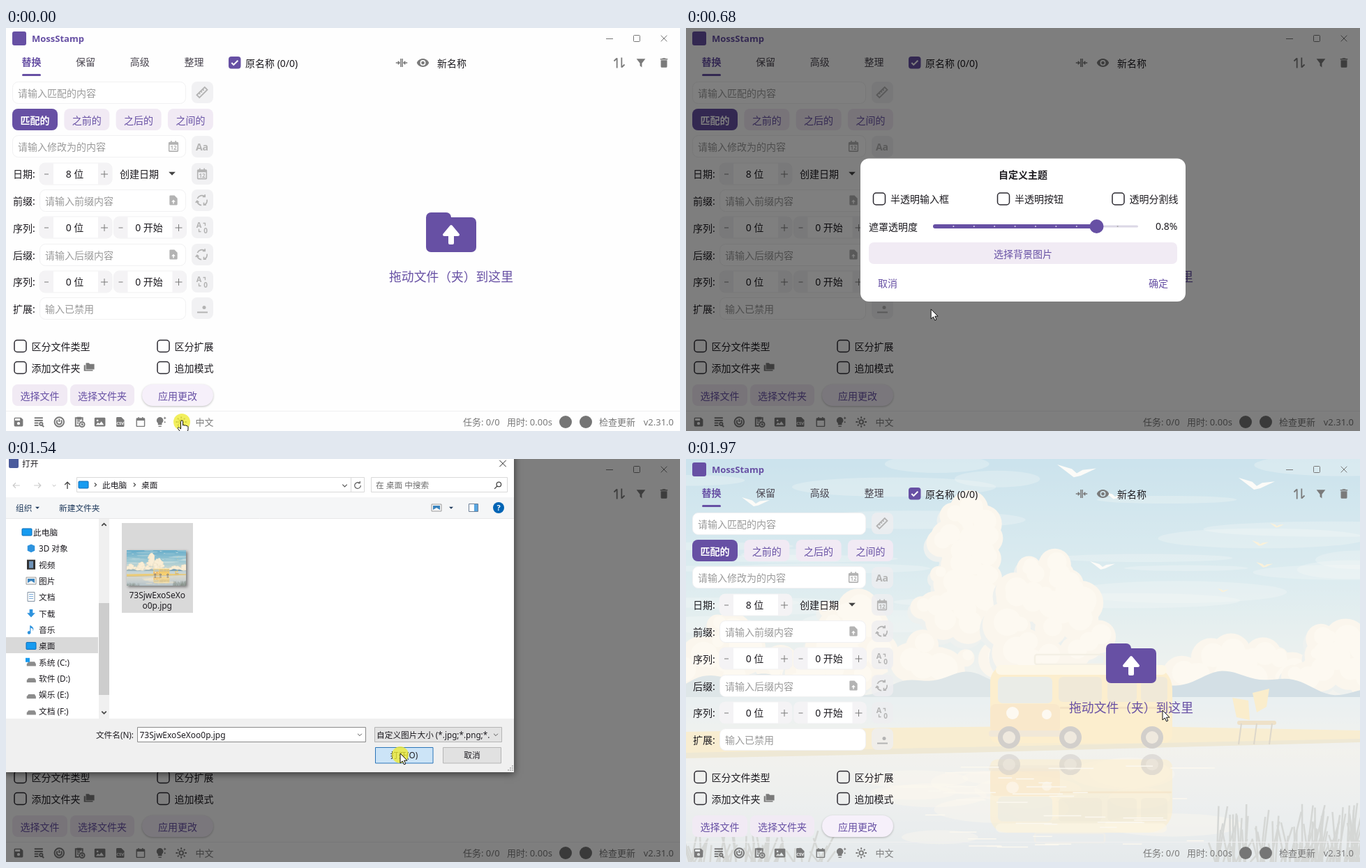
Write an HTML page with a canvas that moves like this. It is 966 by 579 pixels and loops after 2.42 s.

```html
<!DOCTYPE html>
<html lang="zh">
<head>
<meta charset="utf-8">
<style>
html, body { margin: 0; width: 100%; height: 100%; overflow: hidden; background: #fefefe; }
canvas { display: block; }
</style>
</head>
<body>
<canvas id="stage" width="966" height="579"></canvas>
<script>
const W = 966, H = 579, LOOP = 2420;
const STEPS = [0, 470, 540, 610, 680, 750, 820, 890, 960, 1020, 1080, 1150, 1210, 1280,
  1340, 1410, 1470, 1540, 1610, 1680, 1750, 1820, 1900, 1970];
const FONT = '"Noto Sans", "Noto Sans CJK SC", "Noto Sans CJK", sans-serif';
const PURPLE = '#6750a4', PILL = '#f1eaf4', INK = '#1d1b20', GREY = '#7a7a7a', HINT = '#9a9a9a', FAINT = '#b3b3b3';
let g = document.getElementById('stage').getContext('2d');

const ICON = {
  trash: 'M6 19a2 2 0 0 0 2 2h8a2 2 0 0 0 2-2V7H6zM19 4h-3.5l-1-1h-5l-1 1H5v2h14z',
  filter: 'M3 4h18l-7 9v8l-4-3v-5z',
  sort: 'M8 21V4M3 9L8 4M16 3v17M21 15L16 20',
  eye: 'M12 4.5C7 4.5 2.7 7.6 1 12c1.7 4.4 6 7.5 11 7.5s9.3-3.1 11-7.5c-1.7-4.4-6-7.5-11-7.5zM12 7a5 5 0 1 1 0 10a5 5 0 1 1 0-10zM12 9a3 3 0 1 0 0 6a3 3 0 1 0 0-6z',
  split: 'M1 12h7M5 9l3 3-3 3M23 12h-7M19 9l-3 3 3 3M10.5 4v16M13.5 4v16',
  calendar: 'M5 4h2V2h2v2h6V2h2v2h2a2 2 0 0 1 2 2v14a2 2 0 0 1-2 2H5a2 2 0 0 1-2-2V6a2 2 0 0 1 2-2zM5 9v11h14V9z',
  ruler: 'M2 17L17 2l5 5L7 22zM6 13l2.5 2.5M9.5 9.5l2.5 2.5M13 6l2.5 2.5',
  fileUp: 'M6 2h8l6 6v12a2 2 0 0 1-2 2H6a2 2 0 0 1-2-2V4a2 2 0 0 1 2-2zM11 19h2v-4h3l-4-4-4 4h3z',
  cycle: 'M4 9a8.5 8.5 0 0 1 13-3.5M17 2v4h-4M20.5 11a8.5 8.5 0 0 1-5 9M19 20h-4v-4M11 20.5a8.5 8.5 0 0 1-7.5-7M1 16l2.5-3 3 2.5',
  swap: 'M14 4h4v5M10 20H6v-5',
  save: 'M5 3h12l4 4v12a2 2 0 0 1-2 2H5a2 2 0 0 1-2-2V5a2 2 0 0 1 2-2zM5 5v4h10V5zM12 12a3 3 0 1 0 0 6a3 3 0 1 0 0-6z',
  list: 'M3 4h17M3 9h17M3 14h8M3 19h8M16.5 13a3 3 0 1 0 0 6a3 3 0 1 0 0-6M19 19l3 3',
  power: 'M12 2.5a9.5 9.5 0 1 0 0 19a9.5 9.5 0 1 0 0-19M12 6v6M8.5 8.5a5 5 0 1 0 7 0',
  clip: 'M11 20H4V4h14v6M8 3h6v3H8zM7 10h6M7 14h3M17 12a5 5 0 1 0 0 10a5 5 0 1 0 0-10M17 14.5v3h2',
  image: 'M3 3h18a2 2 0 0 1 2 2v14a2 2 0 0 1-2 2H3a2 2 0 0 1-2-2V5a2 2 0 0 1 2-2zM4 18h16l-5-7-4 5-3-3zM7 7a2 2 0 1 0 .1 0z',
  doc: 'M6 2h8l6 6v12a2 2 0 0 1-2 2H6a2 2 0 0 1-2-2V4a2 2 0 0 1 2-2z',
  bulb: 'M10 2a7 7 0 0 0-4 12.5V18h8v-3.5A7 7 0 0 0 10 2zM7 20h6v2H7zM20 1l1 2 2 1-2 1-1 2-1-2-2-1 2-1zM20 10l.7 1.5 1.5.7-1.5.7-.7 1.5-.7-1.5-1.5-.7 1.5-.7z',
  sun: 'M12 8a4 4 0 1 0 0 8a4 4 0 1 0 0-8M12 1v4M12 19v4M1 12h4M19 12h4M4.5 4.5l2.5 2.5M17 17l2.5 2.5M4.5 19.5L7 17M17 7l2.5-2.5',
  folders: 'M5 4h6l2 2h9v11H5zM1 8h3v10h15v2H1z',
  cross: 'M4 4L20 20M20 4L4 20',
  tick: 'M4.5 12.5l5 5L20 7',
  down: 'M5 9l7 7 7-7',
  up: 'M5 16l7-7 7 7',
  right: 'M9 5l7 7-7 7',
  left: 'M21 12H3M10 5l-7 7 7 7',
  ahead: 'M3 12h18M14 5l7 7-7 7',
  rise: 'M12 21V3M5 10l7-7 7 7',
  refresh: 'M20 12a8 8 0 1 1-3-6.2M18 1v5h-5',
  lens: 'M14.5 3a6 6 0 1 0 0 12a6 6 0 1 0 0-12M10 14l-7 7',
  caret: 'M3 8h18l-9 9z',
  note: 'M9 2v14a4 4 0 1 0 2 3V8c6 1 6 4 5 8 4-6 1-10-5-14z',
  arrow: 'M8 2h8v9h6L12 22 2 11h6z',
  cube: 'M12 2l9 4v12l-9 4-9-4V6z',
  drive: 'M2 13l4-5h14l3 5v5H2z'
};

function box(x, y, w, h, r, fill, stroke, lw = 1) {
  g.beginPath();
  g.roundRect(x, y, w, h, r);
  if (fill) { g.fillStyle = fill; g.fill(); }
  if (stroke) { g.strokeStyle = stroke; g.lineWidth = lw; g.stroke(); }
}
function oval(x, y, rx, ry, fill) {
  g.beginPath();
  g.ellipse(x, y, rx, ry, 0, 0, 7);
  g.fillStyle = fill;
  g.fill();
}
const disc = (x, y, r, fill) => oval(x, y, r, r, fill);
function line(x1, y1, x2, y2, col, lw = 1) {
  g.beginPath();
  g.moveTo(x1, y1);
  g.lineTo(x2, y2);
  g.strokeStyle = col;
  g.lineWidth = lw;
  g.stroke();
}
function text(s, x, y, size = 14, col = INK, align = 'left', weight = 400) {
  g.font = `${weight} ${size}px ${FONT}`;
  g.textAlign = align;
  g.fillStyle = col;
  g.fillText(s, x, y + size * 0.37);
}
function icon(name, x, y, size, col, lw) {
  const p = new Path2D(ICON[name]);
  g.save();
  g.translate(x - size / 2, y - size / 2);
  g.scale(size / 24, size / 24);
  if (lw) {
    g.strokeStyle = col;
    g.lineWidth = lw * 24 / size;
    g.stroke(p);
  } else {
    g.fillStyle = col;
    g.fill(p, 'evenodd');
  }
  g.restore();
}
function poly(col, ...pts) {
  g.beginPath();
  for (let i = 0; i < pts.length; i += 2) g.lineTo(pts[i], pts[i + 1]);
  g.closePath();
  g.fillStyle = col;
  g.fill();
}
// Paints a group as one sheet with a common opacity.
function layer(alpha, draw) {
  const outer = g, sheet = document.createElement('canvas');
  sheet.width = W;
  sheet.height = H;
  g = sheet.getContext('2d');
  draw();
  g = outer;
  g.save();
  g.globalAlpha = alpha;
  g.drawImage(sheet, 0, 0);
  g.restore();
}
function fade(y0, y1, ...cols) {
  const f = g.createLinearGradient(0, y0, 0, y1);
  cols.forEach((c, i) => f.addColorStop(i / (cols.length - 1), c));
  return f;
}

// --- wallpaper ---
let seed = 1;
const rnd = () => (seed = seed * 16807 % 2147483647) / 2147483647;

function cloud(cx, top, wide, n, lean = 0) {
  const puffs = Array.from({ length: n }, () => {
    const u = rnd();
    return [cx + lean * u + (rnd() * 2 - 1) * wide * (0.25 + 0.75 * u), top + 20 + u * (300 - top), 12 + rnd() * 22];
  });
  for (const [x, y, r] of puffs) disc(x - 4, y + 7, r, '#cfd6d0');
  for (const [x, y, r] of puffs) disc(x, y, r, '#f3e6cb');
  for (const [x, y, r] of puffs) disc(x + 3, y - 4, r * 0.6, '#faeed6');
}
function ridge(col, base, amp, x0, x1, k) {
  g.beginPath();
  g.moveTo(x0, 348);
  for (let x = x0; x <= x1; x += 6)
    g.lineTo(x, base - amp * (0.6 + 0.4 * Math.sin(x * k) + 0.15 * Math.sin(x * k * 3.3)));
  g.lineTo(x1, 348);
  g.fillStyle = col;
  g.fill();
}
function van() {
  box(500, 281, 100, 14, 3, null, '#e0d3b4', 2.5);
  box(436, 296, 261, 112, [24, 34, 12, 10], '#f6cf70');
  box(444, 296, 245, 14, 10, '#fbe8b8');
  box(436, 352, 100, 42, 8, '#efbb66');
  box(447, 313, 78, 38, 7, '#c3c7b8');
  for (const [x, w] of [[534, 62], [604, 42], [652, 38]]) box(x, 313, w, 36, 6, '#d3c08e');
  box(536, 356, 160, 3, 1, '#e0aa55');
  disc(468, 365, 9, '#faefd6');
  disc(517, 367, 7, '#faefd6');
  box(434, 390, 110, 9, 4, '#d6bc8c');
  for (const x of [463, 551, 668]) {
    disc(x, 400, 16, '#7d7268');
    disc(x, 400, 9, '#d0c0a0');
  }
}
function bird(x, y, s, col) {
  poly(col, x - 2 * s, y - s, x - s * 0.5, y - s * 0.55, x, y - s * 0.1, x + s * 0.6, y - s * 0.45,
    x + 2 * s, y - s * 0.6, x + s * 0.4, y + s * 0.15, x - s * 0.3, y + s * 0.3);
}
function scene() {
  seed = 77;
  g.save();
  g.beginPath();
  g.rect(0, 0, W, H);
  g.clip();
  box(0, 0, W, 350, 0, fade(0, 345, '#68adca', '#9ac7d3', '#e0dfd0'));
  for (let i = 0; i < 26; i++) oval(rnd() * W, rnd() * 240, 60 + rnd() * 130, 4 + rnd() * 12, 'rgba(238,240,232,.28)');
  cloud(70, 215, 90, 24);
  cloud(225, 190, 90, 26);
  cloud(400, 50, 95, 60);
  cloud(500, 125, 110, 50, 50);
  cloud(800, 255, 120, 26);
  cloud(930, 235, 70, 20);
  ridge('#9fb6bb', 342, 32, 0, 450, 0.02);
  ridge('#7ea3b4', 343, 34, 690, W, 0.018);
  box(0, 342, W, H - 342, 0, fade(342, H, '#c0d3d8', '#dad9cc', '#c9d0d0', '#b4c2c8'));
  for (let i = 0; i < 14; i++) oval(300 + rnd() * 400, 450 + rnd() * 110, 40 + rnd() * 60, 8 + rnd() * 16, 'rgba(250,236,205,.4)');
  poly('#ebcc78', 0, 392, 300, 386, 600, 383, W, 390, W, 405, 700, 412, 400, 418, 0, 424);
  poly('#cdbb85', 0, 422, 400, 414, W, 402, W, 407, 400, 422, 0, 430);
  van();
  g.save();
  g.globalAlpha = 0.6;
  g.translate(0, 815);
  g.scale(1, -0.94);
  van();
  g.restore();
  poly('#f0cb6a', 783, 343, 806, 347, 808, 375, 789, 371);
  poly('#f0cb6a', 812, 336, 836, 330, 832, 356, 818, 364);
  box(790, 376, 56, 6, 3, '#cfa75e');
  for (const x of [796, 818, 840]) line(x, 380, x - 4, 410, '#9c8b68', 2);
  for (let i = 0; i < 40; i++) {
    const x = 330 + rnd() * 400, y = 440 + rnd() * 120;
    line(x, y, x + 15 + rnd() * 60, y, '#f3ead2', 1.5);
  }
  for (let i = 0; i < 150; i++) {
    const right = i % 3 > 0, x = right ? W - 210 * rnd() ** 1.4 : 210 * rnd();
    const tall = (right ? 70 : 35) * rnd() + 15;
    line(x, H, x + rnd() * 34 - 14, H - tall, '#848b84', 2.5);
  }
  for (const [x, y, s] of [[100, 65, 10], [560, 22, 14], [615, 55, 8], [597, 156, 9], [818, 40, 13]]) bird(x, y, s, '#f8f5ea');
  for (const [x, y, s] of [[847, 97, 5], [823, 123, 6], [829, 154, 6], [770, 190, 4]]) bird(x, y, s, '#f2d894');
  g.restore();
}

// --- main window ---
const check = (x, y) => box(x, y - 8.5, 17, 17, 4, null, '#2b2930', 1.5);
const input = (x, y, w, hint) => {
  box(x + 0.5, y + 0.5, w - 1, 31, 8, '#fff', '#f1f1f2');
  text(hint, x + 8, y + 16.5, 14, HINT);
};
function stepper(x, y, label) {
  box(x, y, 104, 31, 8, '#fff', '#f1f1f2');
  box(x, y, 20, 31, [8, 0, 0, 8], '#f4f3f5');
  box(x + 84, y, 20, 31, [0, 8, 8, 0], '#f4f3f5');
  line(x + 7, y + 16, x + 13, y + 16, GREY);
  line(x + 88, y + 16, x + 98, y + 16, GREY);
  line(x + 93, y + 11, x + 93, y + 21, GREY);
  text(label, x + 50.5, y + 16, 14, INK, 'center');
}
function calendar(x, y, col) {
  icon('calendar', x, y, 19, col);
  text('12', x, y + 2.5, 8, col, 'center', 700);
}
function square(y, draw) {
  box(266, y, 31, 31, 8, 'rgba(238,237,240,.8)');
  draw(281, y + 15.5);
}
const cycle = (x, y) => icon('cycle', x, y, 20, FAINT, 1.7);
function letters(x, y) {
  text('A', x - 4.5, y - 3.5, 11, FAINT, 'center', 600);
  text('0', x + 5, y + 5, 10, FAINT, 'center', 600);
  icon('swap', x, y, 18, FAINT, 1.3);
}
function pill(x, y, w, label, on) {
  box(x, y, w, 31, 8, on ? PURPLE : PILL);
  text(label, x + w / 2, y + 16.5, 14, on ? '#fff' : PURPLE, 'center', on ? 600 : 400);
}
function folder() {
  box(602, 265, 36, 30, 7, PURPLE);
  poly(PURPLE, 630, 265, 638, 272, 638, 280, 625, 280);
  box(602, 272, 72, 50, 7, PURPLE);
  poly('#fff', 638, 285, 648, 297, 640, 297, 640, 309, 636, 309, 636, 297, 628, 297);
  g.strokeStyle = '#fff';
  g.lineWidth = 4;
  g.lineJoin = 'round';
  g.stroke();
  g.lineJoin = 'miter';
}
function windowUi() {
  box(9, 5, 20, 20, 3, PURPLE);
  text('MossStamp', 37, 15, 13, PURPLE, 'left', 600);
  line(860, 15.5, 870, 15.5, '#777');
  box(899.5, 10.5, 9, 9, 1, null, '#777');
  icon('cross', 943, 15, 13, '#777', 1);

  text('替换', 36.5, 49, 14, PURPLE, 'center', 700);
  box(23, 66, 27, 3, 1.5, PURPLE);
  ['保留', '高级', '整理'].forEach((s, i) => text(s, 114 + i * 77.7, 49, 14, '#49454f', 'center'));
  box(319, 41, 17.5, 17.5, 4, PURPLE);
  icon('tick', 327.7, 49.7, 14, '#fff', 2);
  text('原名称 (0/0)', 343, 50.5);
  icon('split', 567, 50, 18, GREY, 1.5);
  icon('eye', 597.5, 50, 19, GREY);
  text('新名称', 618, 50.5);
  icon('sort', 879, 50, 20, GREY, 1.8);
  icon('filter', 910, 50, 17, GREY);
  icon('trash', 943, 50, 18, GREY);

  input(9, 77, 249, '请输入匹配的内容');
  square(77, (x, y) => icon('ruler', x, y, 18, FAINT, 1.8));
  ['匹配的', '之前的', '之后的', '之间的'].forEach((s, i) => pill(9 + i * 74.3, 116, 65, s, !i));
  input(9, 154, 249, '请输入修改为的内容');
  calendar(240, 170, FAINT);
  square(155, (x, y) => text('Aa', x, y, 14, FAINT, 'center', 600));

  ['日期:', '前缀:', '序列:', '后缀:', '序列:', '扩展:'].forEach((s, i) => text(s, 10, 210 + i * 38.8));
  stepper(48, 194, '8 位');
  text('创建日期', 163, 209.5);
  icon('caret', 238, 209, 13, '#444');
  square(194, (x, y) => calendar(x, y, FAINT));
  [['前缀', 232], ['后缀', 310]].forEach(([s, y]) => {
    input(48, y, 210, `请输入${s}内容`);
    icon('fileUp', 240, y + 15.5, 17, FAINT);
    square(y, cycle);
    stepper(48, y + 39, '0 位');
    stepper(154.5, y + 39, '0 开始');
    square(y + 39, letters);
  });
  input(48, 387, 210, '输入已禁用');
  square(387, (x, y) => {
    line(x - 7, y + 6, x + 8, y + 6, FAINT, 2);
    disc(x + 3, y - 1, 2.5, FAINT);
  });

  [[12, 457, '区分文件类型'], [217, 457, '区分扩展'], [12, 488, '添加文件夹'], [217, 488, '追加模式']].forEach(([x, y, s]) => {
    check(x, y);
    text(s, x + 24.5, y + 0.5);
  });
  icon('folders', 119.5, 487, 17, GREY);
  pill(9, 512, 79, '选择文件');
  pill(92, 512, 92, '选择文件夹');
  g.save();
  g.shadowColor = 'rgba(0,0,0,.25)';
  g.shadowBlur = 3;
  g.shadowOffsetY = 1;
  box(195, 512, 102, 31, 15.5, '#f6f0fa');
  g.restore();
  text('应用更改', 246, 528.5, 14, PURPLE, 'center');

  line(0, 550.5, W, 550.5, '#f0eff1');
  [['save'], ['list', 2], ['power', 2], ['clip', 2], ['image'], ['doc'], ['calendar'], ['bulb'], ['sun', 1.8]]
    .forEach(([n, lw], i) => icon(n, 18 + i * 29.15, 566, 17, GREY, lw));
  text('CSV', 163.7, 568, 6, '#fff', 'center', 700);
  text('中文', 271.5, 566.5, 13, GREY);
  text('任务: 0/0', 655, 566, 13, GREY);
  text('用时: 0.00s', 718, 566, 13, GREY);
  disc(802, 566, 9, '#757575');
  disc(831, 566, 9, '#757575');
  text('检查更新', 850, 566.5, 13, GREY);
  text('v2.31.0', 957, 566, 13, GREY, 'right');

  folder();
  text('拖动文件（夹）到这里', 638, 357, 17.8, PURPLE, 'center');
}

// --- theme panel ---
const panelShape = () => box(250, 187.5, 466, 205.5, 12, '#fff');
function panel(hover) {
  text('自定义主题', 483, 210.5, 14, INK, 'center', 700);
  [[268.5, '半透明输入框'], [446.5, '半透明按钮'], [611, '透明分割线']].forEach(([x, s]) => {
    check(x, 245.5);
    text(s, x + 24.5, 246);
  });
  text('遮罩透明度', 262, 285.5);
  box(354, 283.5, 294, 3, 1.5, '#dcd8e6');
  box(354, 282, 234, 6, 3, PURPLE);
  for (let i = 1; i < 10; i++) disc(354 + i * 29.4, 285, 1, i < 8 ? '#d9d0ee' : '#aaa');
  disc(588.5, 285, 10, PURPLE);
  text('0.8%', 704.5, 285, 14, INK, 'right');
  box(262, 308, 442, 31, 7, hover ? '#e4dde9' : '#f1ebf4');
  text('选择背景图片', 483, 324.5, 14, PURPLE, 'center');
  text('取消', 275, 367, 14, PURPLE);
  text('确定', 691, 367, 14, PURPLE, 'right');
}

// --- file chooser ---
const BLUE = '#0078d7', SKY = '#179bf0', FRAME = [-3.5, -8, 731.5, 458];
function sideItem(kind, x, y) {
  if (kind === 'screen') box(x - 7, y - 5, 14, 10, 1, SKY, '#0b6cb8');
  else if (kind === 'film') {
    box(x - 6, y - 7, 12, 14, 0, '#333');
    box(x - 3, y - 5, 6, 10, 0, '#6f93b8');
  } else if (kind === 'photo') {
    box(x - 7, y - 5, 14, 10, 0, '#f7f7f7', '#9a9a9a');
    poly('#3b84bd', x - 5, y - 3, x + 5, y - 3, x + 5, y + 3, x, y, x - 5, y + 3);
  } else if (kind === 'page') {
    box(x - 5, y - 7, 10, 13, 0, '#fff', '#7f8fa0');
    for (let i = -4; i < 5; i += 3) line(x - 3, y + i, x + 3, y + i, '#6fa5d8');
  } else if (kind === 'drive') icon('drive', x, y + 2, 15, '#8c8c8c');
  else icon(kind, x, y, 14, '#2e93de');
}
function combo(x, w, fill, edge) {
  box(x + 0.5, 385.5, w, 21, 0, fill, edge);
  icon('down', x + w - 8, 396, 10, '#555', 1);
}
function chooser(t) {
  const blank = t < 960, picked = t >= 1280, pressed = t >= 1540, S = 11.7;
  box(4, -1, 14, 14, 2, blank ? '#3c3566' : '#4a5b9c');
  text('打开', 23, 6.5, S);
  icon('cross', 712, 6.5, 14, '#222', 1);
  box(133, 86, 15, 287, 0, '#f0f0f0');
  icon('up', 140.5, 94, 11, '#444', 1.7);
  icon('down', 140.5, 364, 11, '#444', 1.7);
  if (blank) {
    box(133, 101, 15, 248, 0, '#c0c0c0');
    [[127, 388, 55, 15], [188, 385, 328, 22], [528, 385, 182, 22], [528, 413, 85, 26], [625, 413, 85, 26]]
      .forEach(r => box(...r, 0, '#fff'));
    return;
  }
  box(133, 207, 15, 132, 0, '#cdcdcd');

  icon('left', 15, 38, 13, '#ccc', 1.2);
  icon('ahead', 45, 38, 13, '#ccc', 1.2);
  icon('down', 69, 38, 8, '#bbb', 1);
  icon('rise', 88, 38, 13, '#444', 1.3);
  box(101.5, 26.5, 412, 21, 0, '#fff', '#d9d9d9');
  line(494.5, 27, 494.5, 47, '#d9d9d9');
  sideItem('screen', 111, 37);
  icon('right', 128, 37, 9, '#444', 1.2);
  text('此电脑', 138, 37.5, S);
  icon('right', 184, 37, 9, '#444', 1.2);
  text('桌面', 194, 37.5, S);
  icon('down', 485.5, 38, 11, '#555', 1.2);
  icon('refresh', 504, 38, 13, '#555', 1.2);
  box(523.5, 26.5, 195, 21, 0, '#fff', '#d9d9d9');
  text('在 桌面 中搜索', 530, 38, S, '#6d6d6d');
  icon('lens', 705, 38, 13, '#444', 1.3);

  box(FRAME[0], 55, FRAME[2], 30, 0, '#f5f6f7');
  line(FRAME[0], 85.5, 728, 85.5, '#e8e8e8');
  text('组织', 14, 70.5, S, '#1e395b');
  icon('caret', 45, 70, 8, '#1e395b');
  text('新建文件夹', 76, 70.5, S, '#1e395b');
  sideItem('photo', 617, 70);
  icon('caret', 638, 70, 8, '#1e395b');
  box(663.5, 64.5, 13, 11, 0, '#fff', '#6c7f96');
  box(671, 65, 5, 10, 0, '#58a5e0');
  disc(706, 70, 8, '#0064b5');
  text('?', 706, 70, 11, '#fff', 'center', 700);

  box(0, 256, 132, 23, 0, '#d9d9d9');
  [['screen', '此电脑'], ['cube', '3D 对象'], ['film', '视频'], ['photo', '图片'], ['page', '文档'], ['arrow', '下载'],
    ['note', '音乐'], ['screen', '桌面'], ['drive', '系统 (C:)'], ['drive', '软件 (D:)'], ['drive', '娱乐 (E:)'], ['drive', '文档 (F:)']]
    .forEach(([kind, s], i) => {
      const y = 105 + i * 23.35;
      sideItem(kind, i ? 36 : 30, y);
      if (i === 8) box(28, y - 6, 6, 6, 0, SKY);
      text(s, i ? 47 : 39, y + 0.5, S);
    });

  const over = t >= 1210 && t < 1340;
  if (picked || over) box(166, 92, 102, 129, 0, over ? (picked ? '#cce8ff' : '#e5f3ff') : '#d9d9d9');
  g.save();
  g.shadowColor = 'rgba(0,0,0,.45)';
  g.shadowBlur = 4;
  g.shadowOffsetX = g.shadowOffsetY = 2;
  box(173, 131, 85, 51, 0, '#9bb');
  g.restore();
  g.save();
  g.translate(173, 131);
  g.scale(85 / W, 51 / H);
  scene();
  g.restore();
  text('73SjwExoSeXo', 216.7, 195.5, 12, INK, 'center');
  text('o0p.jpg', 216.7, 211, 12, INK, 'center');

  text('文件名(N):', 183, 396.5, S, INK, 'right');
  combo(188, 327, '#fff', picked ? '#8a8a8a' : BLUE);
  if (t >= 1610) box(191, 389, 128, 15, 0, '#8cc4f2');
  if (picked) text('73SjwExoSeXoo0p.jpg', 191.5, 396.5, 12);
  else line(192.5, 389, 192.5, 404, '#000');
  combo(528, 182, '#e3e3e3', '#b5b5b5');
  g.save();
  g.beginPath();
  g.rect(529, 386, 164, 20);
  g.clip();
  text('自定义图片大小 (*.jpg;*.png;*.bmp)', 531, 396.5, S);
  g.restore();
  box(529.5, 414.5, 82.5, 22.5, 0, pressed ? '#cce4f7' : '#e1e1e1', pressed ? '#2a74b8' : BLUE, pressed ? 1 : 2);
  text('打开(O)', 570.5, 426, S, INK, 'center');
  box(626.5, 414.5, 83, 22.5, 0, '#e1e1e1', '#b5b5b5');
  text('取消', 668, 426, S, INK, 'center');
  for (let i = 0; i < 3; i++)
    for (let j = 0; j <= i; j++) box(725 - j * 3, 440 + i * 3, 2, 2, 0, '#bbb');
}
function showChooser(t) {
  const [alpha, k, dx, dy] = t < 960 ? [0.38, 0.971, 10.3, 6.2]
    : t < 1020 ? [0.92, 1, 0, 0]
    : t < 1610 ? [1, 1, 0, 0]
    : t < 1680 ? [0.6, 0.98, 6.6, 4]
    : [0.1, 0.958, 14, 8.2];
  g.save();
  g.transform(k, 0, 0, k, dx, dy);
  if (alpha > 0.3) {
    g.save();
    g.globalAlpha = alpha;
    g.shadowColor = 'rgba(0,0,0,.6)';
    g.shadowBlur = 10;
    g.shadowOffsetY = 2;
    g.beginPath();
    g.rect(-20, -20, 800, 490);
    g.rect(...FRAME);
    g.clip('evenodd');
    box(...FRAME, 0, '#555');
    g.restore();
  }
  // The frame reaches past the sheet's edge, so it is filled apart from the contents.
  const [x, y, w, h] = FRAME;
  g.save();
  g.globalAlpha = alpha;
  box(x, y, w, 373 - y, 0, '#fff');
  box(x, 373, w, h + y - 373, 0, '#f0f0f0');
  g.restore();
  layer(alpha, () => chooser(t));
  g.restore();
}

// --- pointer ---
const PATH = [[0, 252, 564], [470, 252, 564], [820, 405, 317], [1020, 405, 317], [1280, 222, 160],
  [1540, 565, 423], [1680, 566, 422], [1900, 683, 361], [LOOP, 683, 361]];
const ARROW = new Path2D('M0 0v14l3.3-3 2.3 5 2.2-1-2.2-4.8H10z');
const HAND = new Path2D('M-1.5 1.5a1.5 1.5 0 0 1 3 0V7l1-.6 1.8.8 1.2-.4 1.5 1 1-.2 1 1.2V13l-1.5 5H-1L-5.5 11.5c-1-1.5 1-2.5 2-1.3l2 1.8z');
function pointer(t) {
  const i = PATH.findIndex((p, n) => n && t < p[0]), [t0, x0, y0] = PATH[i - 1], [t1, x1, y1] = PATH[i];
  const u = (t - t0) / (t1 - t0), e = u * u * (3 - 2 * u);
  const x = x0 + (x1 - x0) * e, y = y0 + (y1 - y0) * e;
  const during = (a, b) => t >= a && t < b;
  if (t < 540 || during(820, 890) || during(1280, 1340) || during(1540, 1680) || during(1900, 1970))
    disc(x, y + 2, 12, 'rgba(238,234,48,.78)');
  const hand = t < 540 || during(750, 890) || during(1680, 1750) || during(1900, 1970);
  g.save();
  g.translate(x, y);
  g.fillStyle = '#fff';
  g.strokeStyle = '#111';
  g.lineWidth = 1;
  g.fill(hand ? HAND : ARROW);
  g.stroke(hand ? HAND : ARROW);
  g.restore();
}

function render(t) {
  box(0, 0, W, H, 0, '#fefefe');
  if (t >= 1750) {
    scene();
    box(0, 0, W, H, 0, 'rgba(255,255,255,.66)');
  }
  windowUi();
  const opening = t >= 470 && t < 540;
  if (t >= 470 && t < 1970) {
    box(0, 0, W, H, 0, `rgba(0,0,0,${opening ? 0.26 : 0.5})`);
    panelShape();
    if (opening) {
      g.save();
      g.clip();
      layer(0.46, windowUi);
      g.restore();
    }
    layer(opening ? 0.6 : 1, () => panel(t >= 750 && t < 960));
  }
  if (t >= 890 && t < 1750) showChooser(t);
  pointer(t);
}

let shown = -1;
const start = performance.now();
function tick() {
  const now = (performance.now() - start) % LOOP;
  const step = STEPS.findLast(s => s <= now);
  if (step !== shown) render(shown = step);
  requestAnimationFrame(tick);
}
tick();
</script>
</body>
</html>
```
